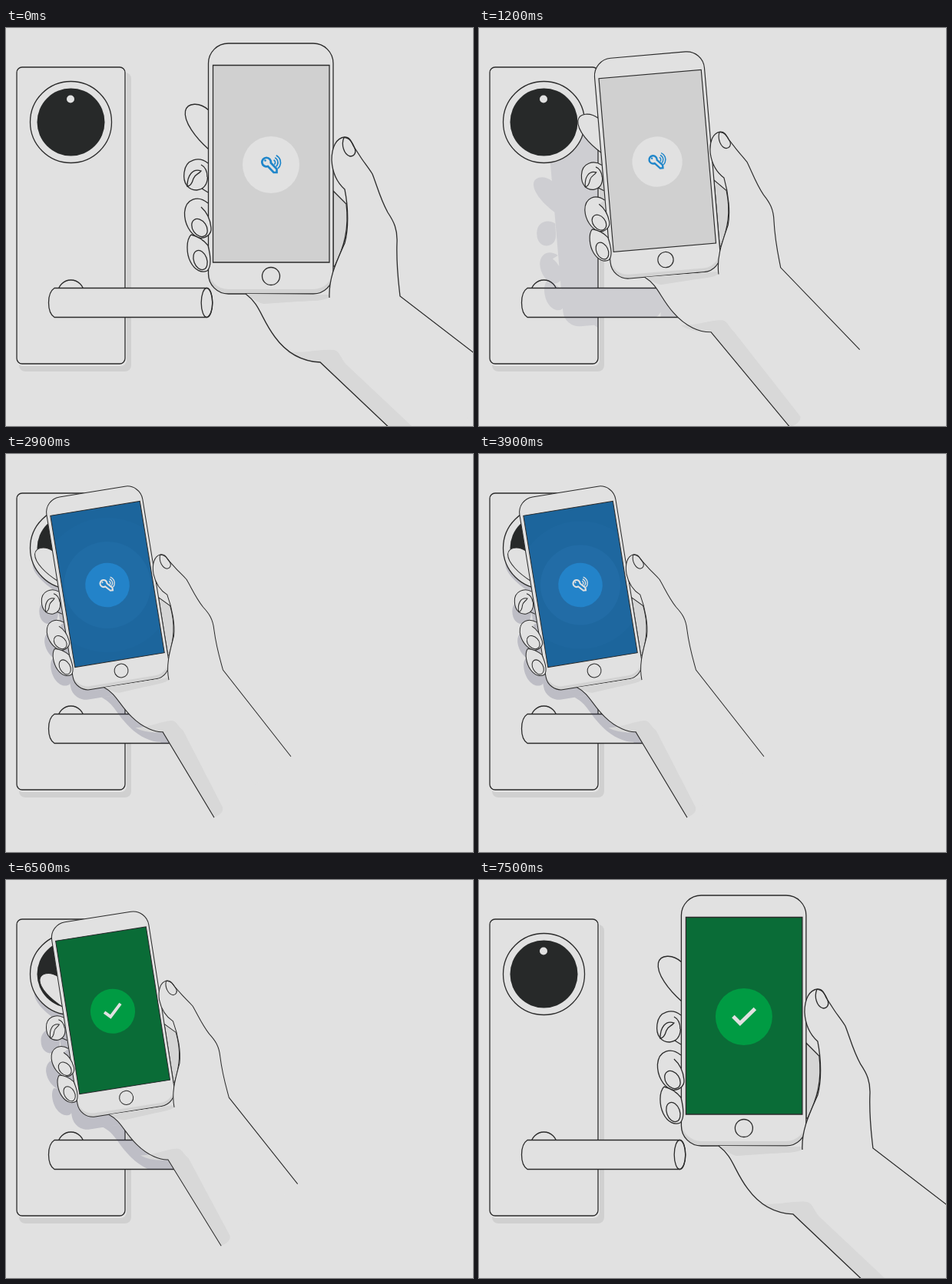
Write an HTML page with a canvas that moves like this. It is 608 px wide and 518 px high and loops after 8 s.

```html
<!DOCTYPE html>
<html lang="en">
<head>
<meta charset="utf-8">
<title>Phone unlocking a door</title>
<style>
  html, body { margin: 0; width: 100%; height: 100%; overflow: hidden; background: #e1e1e1; }
  canvas { display: block; }
</style>
</head>
<body>
<canvas id="stage" width="608" height="518"></canvas>
<script>
const ctx = document.getElementById('stage').getContext('2d');
const LOOP = 8000, STEP = 100, TAU = Math.PI * 2;
const PAPER = '#e1e1e1', INK = '#2b2b2b', SHADE = '#d2d2d2';
const CX = 345, CY = 178; // centre of the phone's badge

const clamp = v => Math.min(1, Math.max(0, v));
const mix = (a, b, k) => a + (b - a) * k;
const ramp = (t, from, to) => clamp((t - from) / (to - from));
const glide = (t, start) => 1 - (1 - ramp(t, start, start + 1200) ** 2) ** 3.96;

function paint(path, fill, stroke, width = 1.3) {
  if (fill) { ctx.fillStyle = fill; ctx.fill(path); }
  if (stroke) { ctx.strokeStyle = stroke; ctx.lineWidth = width; ctx.stroke(path); }
}
function box(x, y, w, h, r) {
  const p = new Path2D();
  p.roundRect(x, y, w, h, r);
  return p;
}
function oval(x, y, rx, ry = rx, turn = 0) {
  const p = new Path2D();
  p.ellipse(x, y, rx, ry, turn, 0, TAU);
  return p;
}

// Door
const plate = box(14, 51, 141, 386, 7);
const lever = new Path2D('M63 338.5H262C271 343 271 372 262 376.5H63C53 370 53 345 63 338.5Z');
const doorParts = new Path2D();
doorParts.addPath(plate);
doorParts.addPath(lever);

// Phone and fingers; outlines share one winding so they merge in the shadow
const phone = box(426, 20, -162.5, 326, 26);
const screen = box(269.5, 48.5, 151.5, 256.5, 0);
const index = new Path2D('M264 107C252 96 236 97 233.500 108C231 122 247 143 264 158');
const middle = new Path2D('M263 176C252 167 234 170 232 188C230 203 238 211 248 211C258 210 262 203 262.500 194');
const third = new Path2D('M263 228C250 217 234 222 232.500 240C232 255 240 268 250 273C260 275 268 268 267 260C266 250 262 240 254 233');
const fourth = new Path2D('M241 269C234 276 235 294 240 304C246 316 255 319 262 316C268 310 266 295 263 283C258 277 250 271 241 269');
const fingers = [index, middle, third, fourth];
const curl = new Path2D('M236 206C236 192 243 182 254 186C250 191 246 190 244 196C242 203 240 206 236 206ZM254 178C260 181 262 187 262 194M255 209L263 214');
const gap = new Path2D('M426 212L443 229C447 262 440 285 428 310H426Z');
const thumbNail = new Path2D('M440 142.500C436 152 440 165 448 167C453 167 456 163 454.500 158C452 151 448 142 440 142.500Z');
const phoneShade = new Path2D('M314 347H420V351C415 355 400 355 380 356L336 359C328 358 323 353 314 347Z');

// Edge of the hand from the upper wrist over the thumb to the palm
const THUMB = 'C511 330 508 310 509 280C510 262 505 252 497 240C487 222 483 205 477 190' +
  'C472 182 467 176 463 170L452 153C449 146 447 142 441 142C430 143 424 155 424 172' +
  'C425 190 432 202 441 210C446 235 446 262 441 280C430 305 420 325 421 351';

const key = new Path2D('M341 180A5.800 5.800 0 1 1 344.800 175.500L352.500 183.500V188H348.500Z');
const waves = new Path2D();
for (const r of [3.5, 7, 10.5]) {
  waves.moveTo(347 + r * Math.cos(-1.1), 175 + r * Math.sin(-1.1));
  waves.arc(347, 175, r, -1.1, 0.85);
}
const tick = new Path2D('M331 177.500L340 186.500L359.500 167.500');

function buildHand(p) {
  const wx = 409 - 12 * p;
  const ux = mix(638, 602, p), uy = mix(445, 510, p);
  const lx = mix(560, 459, p), ly = mix(578, 590, p);
  const lower = `M312 346C331 360 332 378 350 402C366 424 386 434 ${wx} 435L${lx} ${ly}`;
  const upper = `${ux} ${uy}L513 349${THUMB}`;
  return {
    fill: new Path2D(`${lower}L${upper}L420 347Z`),
    line: new Path2D(`${lower}M${upper}`),
    shade: new Path2D(`M${wx - 44} 421C${wx - 20} 424 ${wx} 417 ${wx + 18} 419` +
      `C${wx + 26} 421 ${wx + 26} 429 ${wx + 34} 438L${lx + 17} ${ly - 14}` +
      `Q${lx + 17} ${ly - 4} ${lx} ${ly}L${wx} 435C${wx - 16} 435 ${wx - 32} 430 ${wx - 44} 421Z`)
  };
}

function place(p, dx = 0, dy = 0, size = 1) {
  const s = mix(1, 0.779, p) * size;
  ctx.translate(mix(CX, 132, p) + dx, mix(CY, 170.5, p) + dy);
  ctx.rotate(-9.2 * p * Math.PI / 180);
  ctx.scale(s, s);
  ctx.translate(-CX, -CY);
}

function drawDoor(p, hand) {
  paint(box(17, 58, 146, 389, 8), '#d0d0d0');
  paint(box(14, 51, 143, 389, 8), '#e5e5e5');
  paint(plate, PAPER, INK);
  paint(oval(84.5, 345, 17), PAPER, INK);
  paint(lever, PAPER, INK);
  paint(oval(261.5, 357.5, 7.3, 19), null, INK);

  ctx.save();
  ctx.clip(doorParts);
  const away = 1 - p;
  place(p, -3 - 137 * away, 13 + 135 * away, 1 - 0.2 * away);
  const shadow = new Path2D();
  [phone, hand.fill, ...fingers].forEach(part => shadow.addPath(part));
  paint(shadow, `rgba(60,60,95,${0.22 * p})`);
  ctx.restore();

  paint(oval(84.5, 122.5, 53), PAPER, INK);
  paint(oval(84.5, 122.5, 44), '#272929');
  paint(oval(84, 92.5, 5), PAPER);
}

function drawKey(color) {
  paint(key, null, color, 2.7);
  paint(oval(337.5, 172.5, 1.3), color);
  paint(waves, null, color, 1.7);
}

function drawRipples(t) {
  ctx.save();
  ctx.clip(screen);
  for (const lag of [0, 0.4]) {
    const turn = (t - 2100) / 1060 - lag;
    if (turn < 0) continue;
    const phase = turn % 1;
    paint(oval(CX, CY, 37 + 100 * phase), `rgba(60,150,215,${0.16 * (1 - phase)})`);
  }
  ctx.restore();
}

function drawLayer(alpha, back, badge, content) {
  if (!alpha) return;
  ctx.globalAlpha = alpha;
  paint(screen, back);
  content.under?.();
  paint(oval(CX, CY, 37), badge);
  content.icon();
  ctx.globalAlpha = 1;
}

function drawPhone(t) {
  paint(phone, SHADE);
  ctx.save();
  ctx.clip(phone);
  paint(box(263.5, 14, 162.5, 326, 26), PAPER);
  paint(box(263.5, 20, 162.5, 200, 26), PAPER);
  ctx.restore();
  paint(phone, null, INK);

  drawLayer(1, '#d0d0d0', PAPER, { icon: () => drawKey('#1f86ca') });
  drawLayer(ramp(t, 1850, 2150), '#1c659c', '#2383c9',
    { under: () => drawRipples(t), icon: () => drawKey(PAPER) });
  drawLayer(ramp(t, 6150, 6350), '#0a6c37', '#009b43',
    { icon: () => paint(tick, null, PAPER, 5) });
  paint(screen, null, INK);
  paint(oval(345, 323, 11.5), null, INK);
}

function drawHand(t, p, hand) {
  ctx.save();
  place(p);
  paint(index, PAPER, INK);
  paint(middle, PAPER, INK);
  paint(curl, null, INK);
  paint(gap, '#d5d5d5', INK);
  drawPhone(t);
  paint(third, PAPER, INK);
  paint(oval(252, 260, 9, 12.5, -0.6), PAPER, INK);
  paint(fourth, PAPER, INK);
  paint(oval(253, 302, 8.5, 13, -0.35), PAPER, INK);
  paint(hand.fill, PAPER);
  paint(hand.shade, '#d8d8d8');
  paint(phoneShade, '#d5d5d5');
  paint(hand.line, null, INK);
  paint(thumbNail, null, INK);
  ctx.restore();
}

function frame() {
  const t = Math.floor(performance.now() % LOOP / STEP) * STEP;
  const p = glide(t, 700) - glide(t, 6390);
  const hand = buildHand(p);
  ctx.fillStyle = PAPER;
  ctx.fillRect(0, 0, 608, 518);
  drawDoor(p, hand);
  drawHand(t, p, hand);
  requestAnimationFrame(frame);
}
frame();
</script>
</body>
</html>
```
